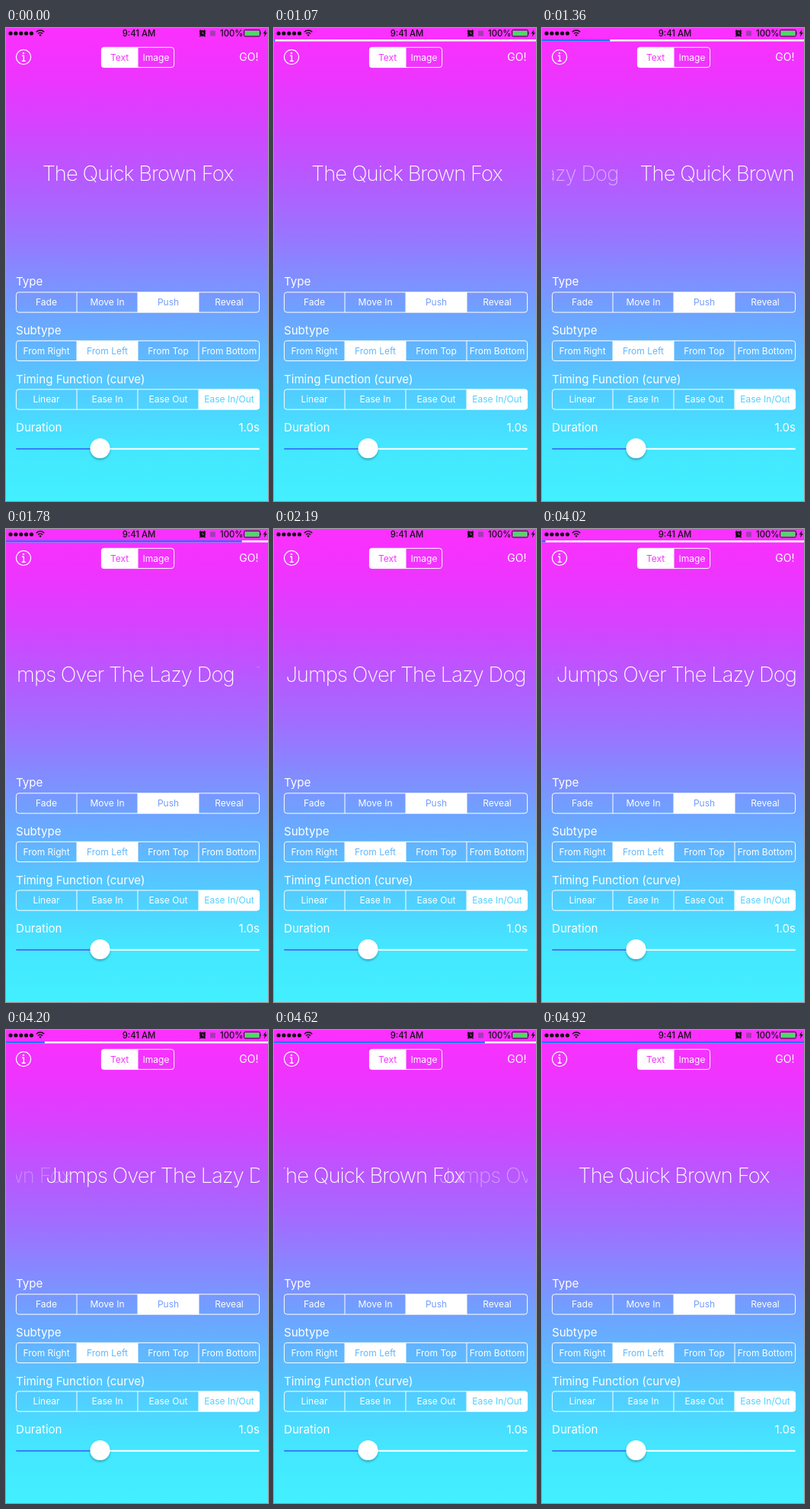
An HTML page for the animation above (5.02 s loop, 344 px wide and 619 px high).

```html
<!DOCTYPE html>
<html lang="en">
<head>
<meta charset="utf-8">
<title>Text transitions</title>
<style>
  html, body { margin: 0; width: 100%; height: 100%; overflow: hidden; background: #42f0ff; }
  svg { display: block; width: 100%; height: 100%; }
  text { font-family: Inter, Roboto, sans-serif; fill: #fff; }
  .label { font-size: 15.1px; }
  .option { font-size: 12px; text-anchor: middle; }
  .status { font-size: 11.3px; font-weight: 500; fill: #111; }
  .title { font-size: 27.3px; font-weight: 200; letter-spacing: -.9px; text-anchor: middle; }
</style>
</head>
<body>
<svg viewBox="0 0 344 619" preserveAspectRatio="none">
  <defs>
    <linearGradient id="sky" gradientUnits="userSpaceOnUse" x1="0" y1="0" x2="0" y2="619">
      <stop offset="0" stop-color="#fc30ff"/>
      <stop offset=".1" stop-color="#ee34ff"/>
      <stop offset=".2" stop-color="#d642ff"/>
      <stop offset=".31" stop-color="#b858ff"/>
      <stop offset=".42" stop-color="#9e70ff"/>
      <stop offset=".5" stop-color="#8886ff"/>
      <stop offset=".6" stop-color="#6ea2ff"/>
      <stop offset=".75" stop-color="#54c8ff"/>
      <stop offset=".88" stop-color="#44e6ff"/>
      <stop offset="1" stop-color="#42f0ff"/>
    </linearGradient>
    <filter id="shadow" x="-50%" y="-50%" width="200%" height="200%">
      <feDropShadow dx="0" dy="2" stdDeviation="1.8" flood-color="#000" flood-opacity=".3"/>
    </filter>
    <clipPath id="stage"><rect x="13" y="165" width="320" height="60"/></clipPath>
  </defs>

  <rect width="344" height="619" fill="url(#sky)"/>

  <g id="progress">
    <rect y="15" width="344" height="2.5" fill="#fff"/>
    <rect id="bar" y="15" width="0" height="2.5" fill="#2470f8"/>
  </g>

  <g id="statusBar" fill="#111">
    <g fill="none" stroke="#111" stroke-width="1.5">
      <path d="M39.8 5.2a7.4 7.4 0 0 1 10.4 0M42 7.5a4.3 4.3 0 0 1 6 0"/>
    </g>
    <path d="M45 11l-1.7-1.9a2.4 2.4 0 0 1 3.4 0z"/>
    <text class="status" x="174.5" y="11" text-anchor="middle">9:41 AM</text>
    <circle cx="258" cy="7" r="3.9"/>
    <path d="M254 4.4l2-1.8M262 4.4l-2-1.8M255.4 10l-1 1.4M260.6 10l1 1.4" stroke="#111" stroke-width="1.4"/>
    <path d="M258 4.8V7.2H260" fill="none" stroke="#f535ff" stroke-width=".8"/>
    <rect x="268" y="3.5" width="7" height="7" fill="#a43cb4"/>
    <text class="status" x="281" y="11">100%</text>
    <rect x="312.5" y="2.5" width="21" height="8.5" rx="1.6" fill="none" stroke="#111" stroke-width=".9"/>
    <rect x="313.8" y="3.8" width="18.4" height="5.9" rx=".6" fill="#4cd964"/>
    <path d="M334.3 5.2q1.5 1.5 0 3z"/>
    <path d="M341.3 2l-3.6 5.3h2.2l-1 4.2 4-5.6h-2.4z"/>
  </g>

  <g fill="none" stroke="#fff" stroke-width="1.2">
    <circle cx="23" cy="38" r="9.6"/>
    <path d="M21 36.2h2.3v7M20.8 43.3h4.8" stroke-width="1.4"/>
    <circle cx="22.9" cy="32.9" r="1.2" fill="#fff" stroke="none"/>
  </g>
  <text x="331.5" y="43" font-size="14" text-anchor="end">GO!</text>

  <g id="controls"></g>

  <text class="label" x="13" y="528">Duration</text>
  <text class="label" x="333" y="528" text-anchor="end">1.0s</text>
  <rect x="13" y="549.8" width="320" height="1.9" rx=".9" fill="#fff"/>
  <rect x="13" y="549.8" width="111" height="1.9" rx=".9" fill="#2470f8"/>
  <circle cx="123.5" cy="550" r="13" fill="#fff" filter="url(#shadow)"/>

  <g clip-path="url(#stage)">
    <text class="title" id="fox" y="200">The Quick Brown Fox</text>
    <text class="title" id="dog" y="200">Jumps Over The Lazy Dog</text>
  </g>
</svg>

<script>
  const $ = id => document.getElementById(id);

  function add(parent, tag, attrs, text) {
    const el = document.createElementNS('http://www.w3.org/2000/svg', tag);
    for (const key in attrs) el.setAttribute(key, attrs[key]);
    if (text) el.textContent = text;
    return parent.appendChild(el);
  }

  function segments(x, y, width, options, selected) {
    const g = $('controls'), w = width / options.length, h = 26.5;
    const first = selected === 0, last = selected === options.length - 1;
    const l = x + selected * w, r = l + w, a = first ? 3.5 : 0, b = last ? 3.5 : 0;
    add(g, 'path', {
      fill: '#fff',
      d: `M${l + a} ${y}H${r - b}q${b} 0 ${b} ${b}V${y + h - b}q0 ${b} ${-b} ${b}` +
         `H${l + a}q${-a} 0 ${-a} ${-a}V${y + a}q0 ${-a} ${a} ${-a}z`
    });
    add(g, 'rect', { x: x + .4, y: y + .1, width: width - .8, height: h - .2, rx: 3.5,
                     fill: 'none', stroke: '#fff', 'stroke-width': 1 });
    options.forEach((name, i) => {
      const cx = x + i * w;
      if (i) add(g, 'path', { d: `M${cx} ${y}v${h}`, stroke: '#fff', 'stroke-width': 1 });
      const label = add(g, 'text', { class: 'option', x: cx + w / 2, y: y + 17.6 }, name);
      if (i === selected) label.style.fill = 'url(#sky)';
    });
  }

  function section(title, y, options, selected) {
    add($('controls'), 'text', { class: 'label', x: 13, y }, title);
    segments(13, y + 8.3, 320, options, selected);
  }

  for (let i = 0; i < 5; i++) add($('statusBar'), 'circle', { cx: 6 + i * 6.85, cy: 7, r: 2.6 });
  segments(125, 25.2, 96, ['Text', 'Image'], 0);
  section('Type', 337.4, ['Fade', 'Move In', 'Push', 'Reveal'], 2);
  section('Subtype', 400.9, ['From Right', 'From Left', 'From Top', 'From Bottom'], 1);
  section('Timing Function (curve)', 464.5, ['Linear', 'Ease In', 'Ease Out', 'Ease In/Out'], 3);

  const LOOP = 5020, CENTER = 173, STEP = 58, ADVANCE = 61;
  // Each push travels the width of the incoming title.
  const pushes = [
    { at: 1070, lead: 48, width: 311, from: $('fox'), to: $('dog') },
    { at: 4020, lead: 84, width: 250, from: $('dog'), to: $('fox') }
  ];
  const clamp = v => Math.min(1, Math.max(0, v));

  // cubic-bezier(.42, 0, .58, 1)
  function easeInOut(x) {
    if (x <= 0 || x >= 1) return clamp(x);
    let lo = 0, hi = 1;
    for (let i = 0; i < 20; i++) {
      const s = (lo + hi) / 2;
      if (s * (1.26 - .78 * s + .52 * s * s) < x) lo = s; else hi = s;
    }
    return lo * lo * (3 - 2 * lo);
  }

  function place(el, x, opacity) {
    el.setAttribute('x', x);
    el.setAttribute('opacity', clamp(opacity));
  }

  function draw(t) {
    const { at, lead, width, from, to } = pushes[t < pushes[1].at ? 0 : 1];
    const elapsed = t < at ? 0 : lead + Math.floor((t - at) / STEP) * ADVANCE;
    const p = easeInOut(elapsed / 1000);
    place(from, CENTER + width * p, 1.9 * (1 - p));
    place(to, CENTER - width * (1 - p), 1.9 * p);
    $('progress').setAttribute('visibility', elapsed > 0 && elapsed < 1070 ? 'visible' : 'hidden');
    $('bar').setAttribute('width', 344 * p);
  }

  const start = performance.now();
  function tick() {
    draw((performance.now() - start) % LOOP);
    requestAnimationFrame(tick);
  }
  tick();
</script>
</body>
</html>
```
